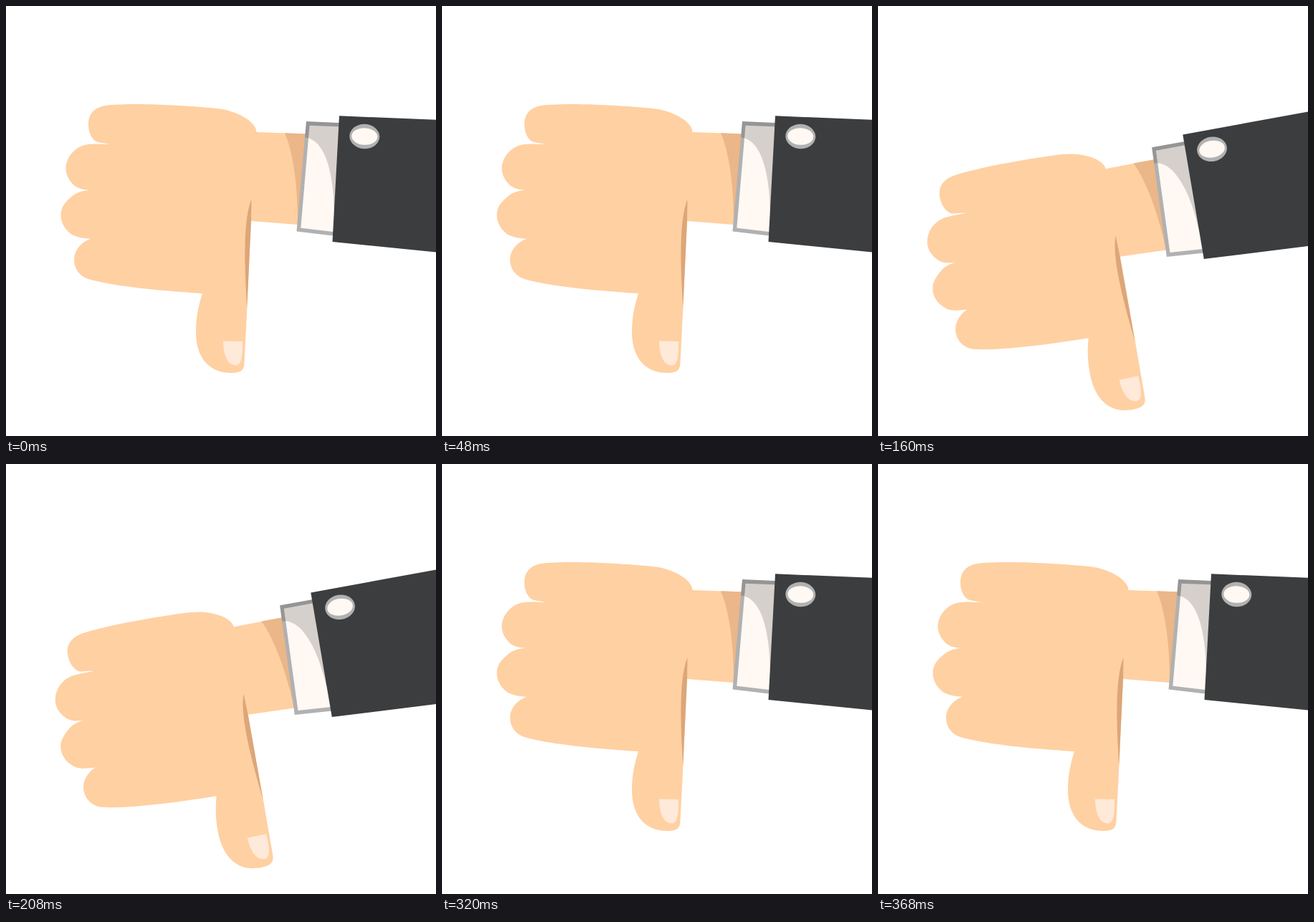
Recreate the animation shown at these times as an HTML page. Size 600 by 600 pixels, loop 400 ms.

```html
<!DOCTYPE html>
<html>
<head>
<meta charset="utf-8">
<title>Thumbs down</title>
<style>
  html, body { margin: 0; width: 100%; height: 100%; overflow: hidden; background: #fff; }
  svg { display: block; width: 100vw; height: 100vh; }
</style>
</head>
<body>
<svg viewBox="0 0 600 600">
  <g id="arm">
    <path id="hand" fill="#ffd0a2" d="M349.5 176C350 163 324 145 290 142.5C250 139 215 137.500 190 137
      C165 137 147 137.500 138 139C122 142 115 152 115 165C115 176 119 184 124 188C128 191 137 191 145 193
      C130 192.500 120 192 112 193.500C95 197 83.500 212 83.500 227C83.500 238 91 247 96 251C103 256 109 256 117 257
      C108 257 100 260 94 264C84 272 76.500 279 76.500 292C76.500 305 86 315 92 319C100 323 109 324 118 325
      C106 329 95 340 95 354C95 367 103 377 115 381C150 391 210 397 274 401
      C268 420 265 435 265 455C265 490 283 512 314 512C327 512 332 509 332.500 498
      L336.500 420L342 300L412 305.500L421 178.500Z"/>
    <path id="thumb-shadow" fill="#dca679" d="M342.500 270C332 295 331.500 350 336.300 420L342 300Z"/>
    <path id="nail" fill="#ffe9d9" d="M303 467.500L330 468C330.500 485 329 501.500 321 501.500C308 501.500 303 485 303 467.500Z"/>
    <path id="wrist-shadow" fill="#ebb688" d="M389 177.200C401 205 407 250 407 305.200L412 305.500L421 178.500Z"/>
    <g id="cuff">
      <path fill="#b1b1b1" d="M419 161L470 163.300L460 321L405.500 314.500Z"/>
      <path fill="#fff8f3" d="M423.500 166.800L470 168.500L460 315.500L411.300 309.800Z"/>
      <path fill-opacity=".16" d="M419 161L470 163.300L460 285H457.500C457 225 442 185 417.100 183.500Z"/>
    </g>
    <path id="sleeve" fill="#3c3d3e" d="M465 153.300L720 163.700V355.500L455.500 329Z"/>
    <g id="button" transform="translate(500.300 182) rotate(3)">
      <ellipse rx="21" ry="17.200" fill="#b1b1b1"/>
      <ellipse rx="18" ry="11.800" fill="#fff8f3"/>
    </g>
  </g>
</svg>
<script>
  const STEP = 80;
  const PIVOT = [455.5, 329];
  // Each pose: pivot shift x, y and rotation in degrees
  const rest = [0, 0, 0], down = [-0.5, 11, -9.55], tilted = [-0.7, 24, -12.75];
  const lowered = [-0.5, 41, -9.55];
  const poses = [rest, down, tilted, lowered, rest];
  const arm = document.getElementById('arm');

  function draw(now) {
    const [dx, dy, angle] = poses[Math.floor(now / STEP) % poses.length];
    arm.setAttribute('transform', `translate(${dx} ${dy}) rotate(${angle} ${PIVOT})`);
    requestAnimationFrame(draw);
  }
  draw(performance.now());
</script>
</body>
</html>
```
